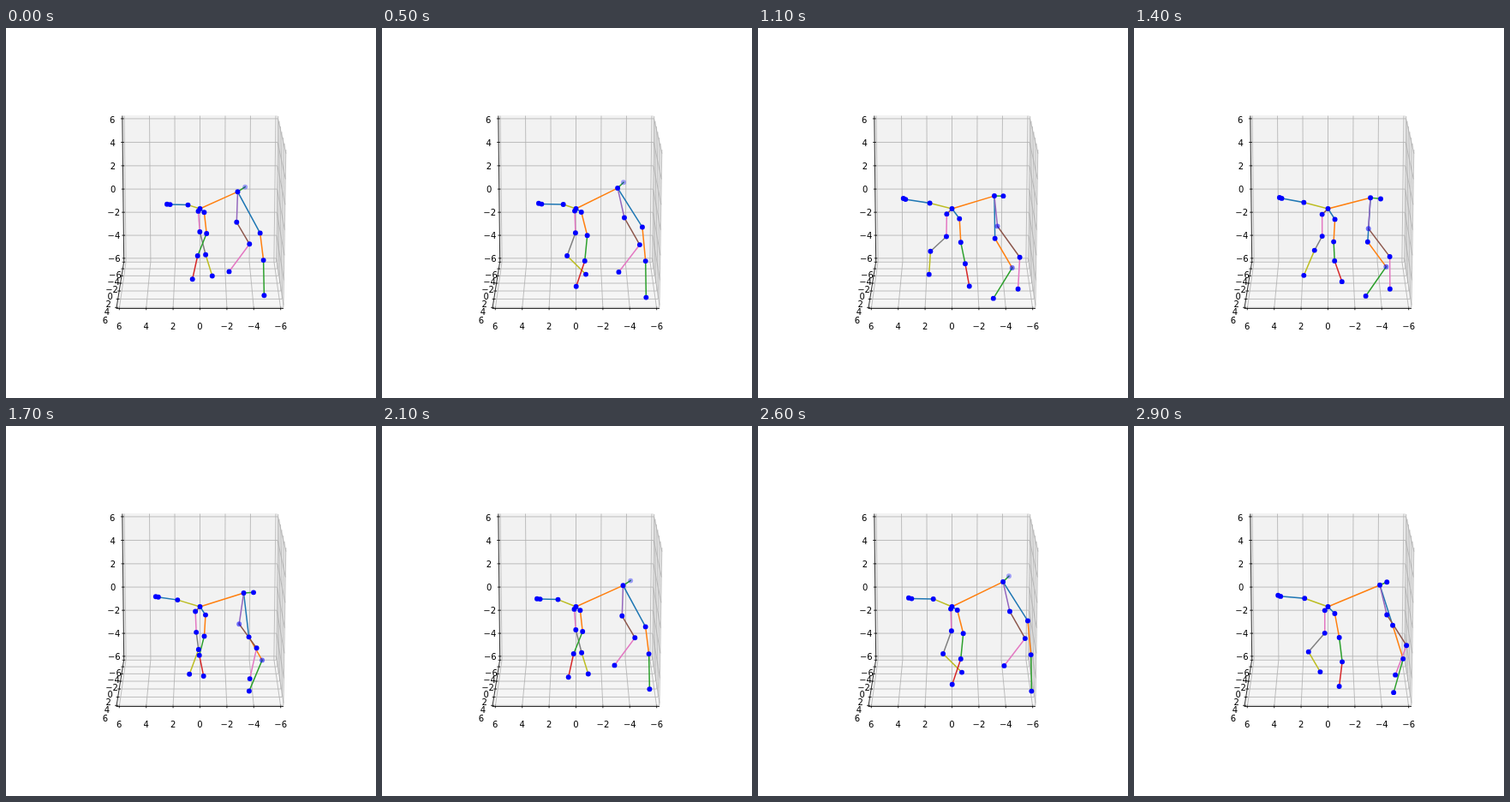
Recreate the animation shown at these times as an HTML page. Size 432x432 px, loop 3000 ms.

```html
<!DOCTYPE html>
<html lang="en">
<head>
<meta charset="utf-8">
<title>Walking skeleton</title>
<style>
  html, body { margin: 0; width: 100%; height: 100%; overflow: hidden; background: #fff; }
  svg { display: block; width: 432px; height: 432px; }
  text { font: 10px "DejaVu Sans", sans-serif; text-anchor: middle; }
  .grid { fill: none; stroke: #b0b0b0; stroke-width: .8; }
  .axis { fill: none; stroke: #000; stroke-width: .8; }
</style>
</head>
<body>
<svg viewBox="0 0 432 432"><g id="stage" transform="translate(.5 .5)"></g></svg>
<script>
const stage = document.getElementById('stage');

function set(el, attrs) {
  for (const k in attrs) el.setAttribute(k, attrs[k]);
  return el;
}
const add = (tag, attrs) =>
  stage.appendChild(set(document.createElementNS('http://www.w3.org/2000/svg', tag), attrs));
const path = (cls, ...pts) => add('polyline', { class: cls, points: pts.join(' ') });
const pane = (fill, ...pts) => add('polygon', { fill, stroke: fill, points: pts.join(' ') });
const mix = (a, b, t) => a + (b - a) * t;

function label(x, y, value) {
  add('text', { x, y: y + 3.7 }).textContent = String(value).replace('-', '\u2212');
}

// Box around the plot: back wall, right wall and floor
const TOP = 102, BACK = 272, FRONT = 327, FRONT_TOP = 142.5;
const depthLeft = d => mix(137.2, 128.4, d);
const depthRight = d => mix(315, 323.5, d);
const wallLeft = h => mix(135.3, 137.2, h);
const wallRight = h => mix(317, 315, h);

function drawBox() {
  pane('#f9f9f9', [317, TOP], [326.5, FRONT_TOP], [323.5, FRONT], [315, BACK]);
  pane('#f2f2f2', [135.3, TOP], [317, TOP], [315, BACK], [137.2, BACK]);
  pane('#f5f5f5', [137.2, BACK], [315, BACK], [323.5, FRONT], [128.4, FRONT]);
  for (let v = -6; v <= 6; v += 2) drawTick(v);
  path('axis', [128.4, FRONT], [323.5, FRONT]);
  path('axis', [137.2, BACK], [128.4, FRONT]);
  path('axis', [135.3, TOP], [137.2, BACK]);
}

function drawTick(v) {
  const x = 226 - 15.7 * v;
  path('grid', [x, FRONT], [226 - 14.4 * v, BACK], [226 - 14.75 * v, TOP]);
  path('axis', [x, FRONT - 1.8], [x, FRONT + 1.8]);
  label(x, 347.6, v);

  const y = 297.5 + 4.42 * v + .05 * v * v, d = (y - BACK) / (FRONT - BACK);
  path('grid', [depthLeft(d), y], [depthRight(d), y], [mix(317, 326.5, d), mix(TOP, FRONT_TOP, d)]);
  path('axis', [depthLeft(d) - 2, y], [depthLeft(d) + 1.8, y]);
  label(121.2 - .95 * v, 313.2 + 4.4 * v + .03 * v * v, v);

  const z = 187.6 - 13.58 * v - .02 * v * v, h = (z - TOP) / (BACK - TOP);
  path('grid', [wallLeft(h), z], [wallRight(h), z], [mix(326.5, 323.5, h), mix(FRONT_TOP, FRONT, h)]);
  path('axis', [wallLeft(h) - 2, z], [wallLeft(h) + 1.8, z]);
  label(124.8 - .17 * v, 188 - 13.5 * v, v);
}

// Every joint swings round its own ellipse once per stride, while its limb drifts
const STRIDE = 2100, LOOP = 3000, STEP = 100;
const BLUE = '#1f77b4', ORANGE = '#ff7f0e', GREEN = '#2ca02c', RED = '#d62728', PURPLE = '#9467bd',
  BROWN = '#8c564b', PINK = '#e377c2', GRAY = '#7f7f7f', OLIVE = '#bcbd22';
const STILL = [0, 0], FORWARD = [11, -5], BACKWARD = [-7, -4];

const root = { drift: STILL, orbit: [[226, 0, 0], [210.5, 0, 0]] };
const joints = [root];

// Each part: colour, then centre, cosine and sine reach for x and for y
function limb(parent, drift, ...parts) {
  return parts.map(([color, ...orbit]) => {
    const joint = { parent, drift, color, orbit };
    joints.push(joint);
    return parent = joint;
  });
}

const [chest, head] = limb(root, FORWARD,
  [ORANGE, [270, 0, 2], [194, -3.3, -6.2]],
  [GREEN, [279.4, -.7, -.5], [191, -5.9, -9.7]]);

const [, foreKnee] = limb(chest, FORWARD,
  [BLUE, [284.4, 11.8, 15.6], [242.7, -3.8, -9.2]],
  [ORANGE, [295.9, 4.2, 8.4], [276.2, -5.6, -3]],
  [GREEN, [286, 14.9, 18.2], [314.8, -3.1, .7]]);

const [farElbow] = limb(chest, FORWARD,
  [PURPLE, [271.7, -2.9, 8.4], [229.4, -3.1, -7]],
  [BROWN, [292.1, -8.3, 6.3], [260.4, -8.6, -6]],
  [PINK, [278.5, -18.5, -3.8], [294.8, -10.9, -8.4]]);

limb(root, BACKWARD,
  [OLIVE, [208.2, 3.8, 4.4], [206.1, 0, .3]],
  [BLUE, [183.5, 7.6, 3.5], [203.8, 1.8, 2.1]],
  [BLUE, [180.4, 7.1, 3.2], [203, 2.2, 2]]);

limb(root, STILL,
  [BROWN, [222.1, 1.9, 2.3], [214.9, -1.5, -1.7]],
  [PINK, [222.8, 3, 2.4], [240.2, -2.7, -1.2]],
  [GRAY, [216.5, 16.1, -2.1], [262.5, 1.8, 2.9]],
  [OLIVE, [220.8, 19.5, 15.3], [288, 1, -1]]);

limb(root, STILL,
  [BLUE, [232.8, -1.9, -.4], [218.2, -3.5, -3.4]],
  [ORANGE, [235.3, -1.6, 4], [244.5, -5, -2.4]],
  [GREEN, [232.7, -9.5, 4.3], [270.3, -4.8, 1.5]],
  [RED, [231.5, -14.3, -4.2], [297.2, -4.5, 4.4]]);

// Dots that turn pale while far away: the angle at which they are farthest, and opacity
head.far = [.9, .35];
foreKnee.far = farElbow.far = [4.2, .55];

drawBox();
for (const j of joints) {
  if (j.parent) j.line = add('line', { stroke: j.color, 'stroke-width': 1.5, 'stroke-linecap': 'square' });
}
for (const j of joints) j.dot = add('circle', { r: 2.95, fill: '#00f' });

function pose(t) {
  const strides = t / STRIDE, angle = strides * 2 * Math.PI;
  const cos = Math.cos(angle), sin = Math.sin(angle);
  for (const j of joints) {
    const [x, y] = j.orbit.map(([mid, c, s], i) => mid + c * cos + s * sin + j.drift[i] * strides);
    j.pos = [x, y];
    set(j.dot, { cx: x, cy: y });
    if (j.far) set(j.dot, { opacity: Math.cos(angle - j.far[0]) > .3 ? j.far[1] : 1 });
    if (j.line) set(j.line, { x1: j.parent.pos[0], y1: j.parent.pos[1], x2: x, y2: y });
  }
}

const start = performance.now();
function tick() {
  const t = Math.max(0, performance.now() - start) % LOOP;
  pose(Math.floor(t / STEP) * STEP);
  requestAnimationFrame(tick);
}
tick();
</script>
</body>
</html>
```
